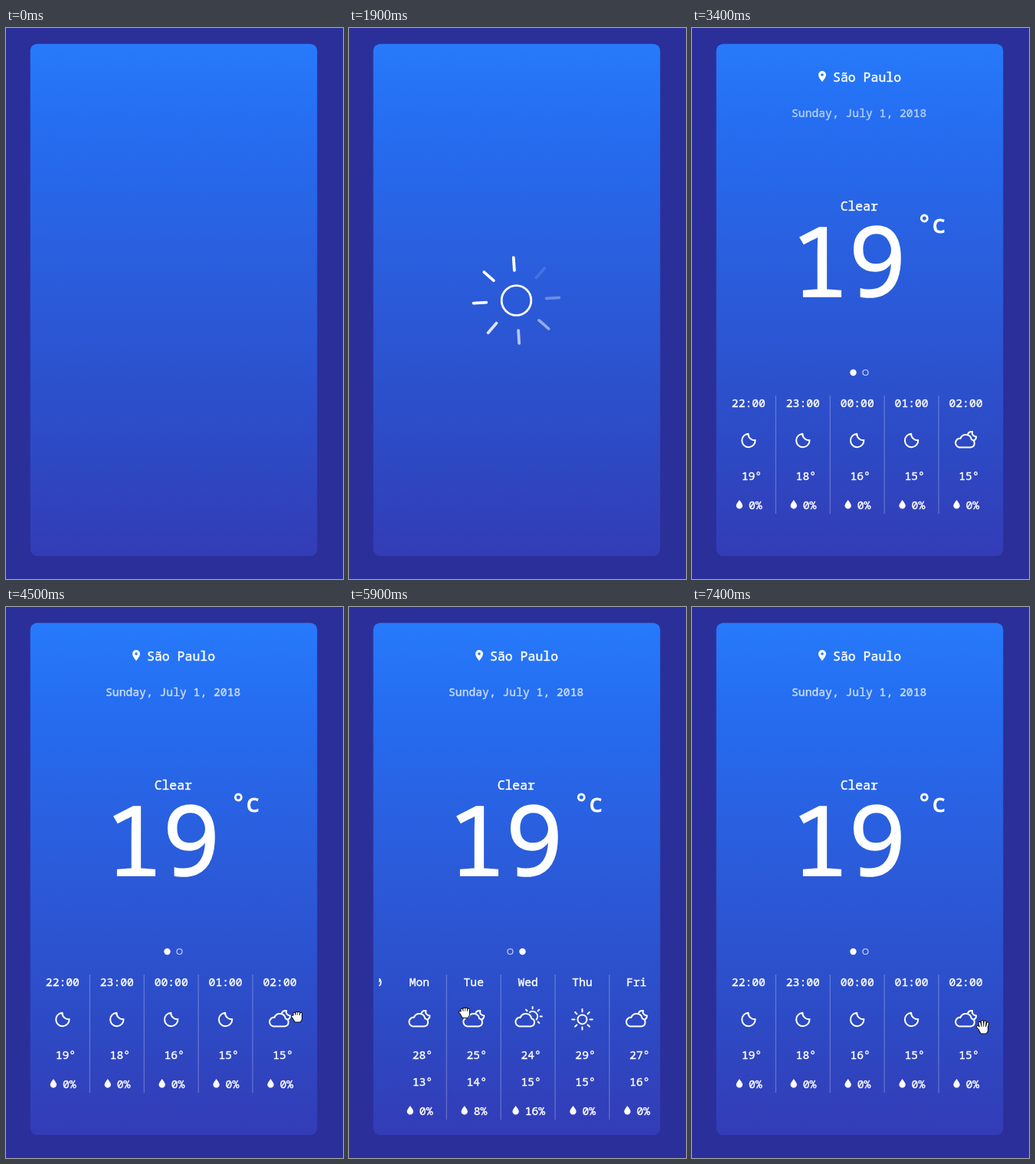
These frames come from a looping animation (440x718 px, 7500 ms). An HTML page:

```html
<!DOCTYPE html>
<html lang="en">
<head>
<meta charset="utf-8">
<title>Weather card</title>
<style>
  html, body { margin: 0; width: 100%; height: 100%; overflow: hidden; background: #2b2f99; }
  svg { display: block; }
  text {
    font-family: "Noto Sans Mono", "DejaVu Sans Mono", monospace; font-size: 14.7px;
    fill: #fff; stroke: #fff; stroke-width: .4px; white-space: pre;
  }
  .line { fill: none; stroke: #fff; stroke-width: 2; stroke-linecap: round; stroke-linejoin: round; }
</style>
</head>
<body>
<svg id="stage" width="440" height="718" viewBox="0 0 440 718">
  <defs>
    <linearGradient id="sky" x1="0" y1="0" x2="0" y2="1">
      <stop offset="0" stop-color="#277afb"/>
      <stop offset=".16" stop-color="#256df1"/>
      <stop offset=".5" stop-color="#2b5ad8"/>
      <stop offset=".78" stop-color="#2d4ac5"/>
      <stop offset="1" stop-color="#333cb6"/>
    </linearGradient>
    <clipPath id="view"><rect x="39" y="470" width="359" height="210"/></clipPath>
  </defs>
  <rect width="440" height="718" fill="#2b2f99"/>
  <rect x="31.7" y="20.7" width="374.6" height="667.4" rx="9" fill="url(#sky)"/>

  <g id="loader" transform="translate(218.5 355)">
    <circle id="ring" r="19.3" class="line" style="stroke-width:2.8"/>
    <g id="rays"></g>
  </g>

  <g id="place">
    <path fill="#fff" fill-rule="evenodd" d="M170 70.3C167.5 66.8 165 64 165 61a5 5 0 0 1 10 0C175 64 172.5 66.8 170 70.3ZM168.2 61a1.8 1.8 0 1 0 3.6 0a1.8 1.8 0 1 0-3.6 0Z"/>
    <text x="184" y="70" style="font-size:16.5px">São Paulo</text>
  </g>
  <text id="date" x="130" y="116">Sunday, July 1, 2018</text>
  <g id="now">
    <text x="193.7" y="238" style="font-size:16.4px">Clear</text>
    <text x="129" y="350.3" style="font-size:125.5px;stroke-width:1.6px">19</text>
    <text x="293.8" y="267" style="font-size:32px;stroke-width:.9px">°c</text>
  </g>
  <g id="forecast">
    <circle id="dot0" cx="210.5" cy="449" stroke="#fff" stroke-width="1.2"/>
    <circle id="dot1" cx="226.5" cy="449" stroke="#fff" stroke-width="1.2"/>
    <g clip-path="url(#view)"><g id="strip"></g></g>
  </g>
  <g id="cursor">
    <path id="shade" stroke="#111" stroke-width="4" fill="#111" stroke-linejoin="round" stroke-linecap="round"/>
    <path id="skin" stroke="#fff" stroke-width="1.9" fill="#fff" stroke-linejoin="round" stroke-linecap="round"/>
  </g>
</svg>
<script>
const LOOP = 7500, COL = 70.9, FIRST = 73.9, PAGE = COL * 5;
const $ = id => document.getElementById(id);
const clamp = v => Math.min(1, Math.max(0, v));
const part = (t, from, length) => clamp((t - from) / length);
const mix = (a, b, u) => a + (b - a) * u;
const easeOut = u => 1 - (1 - u) ** 2;
const easeInOut = u => u * u * (3 - 2 * u);

function add(parent, tag, attrs, text) {
  const el = document.createElementNS("http://www.w3.org/2000/svg", tag);
  for (const k in attrs) el.setAttribute(k, attrs[k]);
  if (text) el.textContent = text;
  return parent.appendChild(el);
}

// Spokes around a point as path data, angles in degrees
const spokes = (cx, cy, r0, r1, angles) => angles.map(a => {
  const c = Math.cos(a * Math.PI / 180), s = Math.sin(a * Math.PI / 180);
  return `M${cx + r0 * c} ${cy + r0 * s}L${cx + r1 * c} ${cy + r1 * s}`;
}).join("");

const eighths = [0, 45, 90, 135, 180, 225, 270, 315];
const CLOUD = "M-8.5 9H6.5A5.2 5.2 0 0 0 7.4 -1.2A7.5 7.5 0 0 0 -7 -2.5A5.8 5.8 0 0 0 -8.5 9Z";
const icons = {
  moon: [["M8.7 -.3A8.7 8.7 0 1 1 -.4 -8.6A8 8 0 0 0 8.7 -.3Z", 0]],
  cloudMoon: [[CLOUD, 0], ["M2.6 -8.2C3.4 -10.6 5.6 -11.8 8.6 -11.4C7.4 -8 9.8 -5 13.6 -5C13.6 -2.8 12.6 -1 10.8 .2", 0]],
  cloudSun: [[CLOUD, -2.8], ["M2.3 -9.3A6.5 6.5 0 0 1 11 .2" +
    spokes(6, -4, 10, 12.3, [-135, -90, -45, 0, 45]), 0]],
  sun: [["M-6 0a6 6 0 1 0 12 0a6 6 0 1 0 -12 0" + spokes(0, 0, 10, 13.3, eighths), 0]]
};

// label, icon, temperatures, rain
const columns = [
  ["22:00", "moon", [19], 0], ["23:00", "moon", [18], 0], ["00:00", "moon", [16], 0],
  ["01:00", "moon", [15], 0], ["02:00", "cloudMoon", [15], 0],
  ["Mon", "cloudMoon", [28, 13], 0], ["Tue", "cloudMoon", [25, 14], 8],
  ["Wed", "cloudSun", [24, 15], 16], ["Thu", "sun", [29, 15], 0], ["Fri", "cloudMoon", [27, 16], 0]
];

columns.forEach(([label, icon, temps, rain], i) => {
  const g = add($("strip"), "g", { transform: `translate(${FIRST + i * COL} 0)` });
  const bottom = temps.length > 1 ? 35 : 0;
  const middle = { "text-anchor": "middle" };
  add(g, "text", { ...middle, x: 0, y: 494 }, label);
  for (const [d, dx] of icons[icon])
    add(g, "path", { class: "line", d, transform: `translate(${dx} 537.4)` });
  temps.forEach((v, n) => add(g, "text", { ...middle, x: 4, y: 589 + n * 35 }, v + "°"));
  const shift = rain > 9 ? -4 : 0;
  add(g, "path", {
    fill: "#fff", transform: `translate(${shift - 12} ${621 + bottom})`,
    d: "M0 -6C2 -3 4.2 -1 4.2 1.4A4.2 4.2 0 0 1 -4.2 1.4C-4.2 -1 -2 -3 0 -6Z"
  });
  add(g, "text", { x: shift, y: 627 + bottom }, rain + "%");
  if (i % 5 < 4)
    add(g, "path", { d: `M${COL / 2} 479V${633 + bottom}`, stroke: "#fff", "stroke-opacity": .32 });
});

const rays = eighths.map(a => add($("rays"), "path", {
  class: "line", d: "M0 -39.3V-56", style: "stroke-width:3.8", transform: `rotate(${a})`
}));

const PALM = "M-4 1L5 1L5 5L3.5 7.5L-2 7.5L-4 4Z";
const ARROW = "M-5 -8V7L-1.5 4L1 9L3 8L.8 3.2H5Z";
const OPEN = PALM + "M-3 1L-4.5 -5M-.5 0L-1 -7M2 0L2.6 -6.6M4.7 1L6.2 -4.5M-3.5 4L-7 0";
const FIST = PALM + "M-3 1L-3.6 -2M-.5 0V-3M2 0L2.2 -3M4.7 1L5.2 -2M-3.5 4L-6 1.5";

const DRAG1 = { from: 4500, length: 350 }, DRAG2 = { from: 5835, length: 400 };
const SETTLE = 590, SWIPE = 247;

function scrollAt(t) {
  const near = PAGE - SWIPE;
  const swipe = d => SWIPE * easeInOut(part(t, d.from, d.length)) +
    near * easeOut(part(t, d.from + d.length, SETTLE));
  return swipe(DRAG1) - swipe(DRAG2);
}

function drawCursor(t) {
  const enter = easeOut(part(t, 3750, 600));
  const left = easeInOut(part(t, DRAG1.from, DRAG1.length));
  const right = easeInOut(part(t, DRAG2.from, DRAG2.length));
  const x = mix(450, 380, enter) - SWIPE * left + SWIPE * right;
  const y = mix(640, 532, enter) - 7 * left + 22 * right;
  const held = [DRAG1, DRAG2].some(d => t >= d.from && t < d.from + d.length);
  const shape = x > 398 ? ARROW : held ? FIST : OPEN;
  $("cursor").setAttribute("transform", `translate(${x} ${y})`);
  $("cursor").setAttribute("opacity", t < 3750 ? 0 : 1);
  $("shade").setAttribute("d", shape);
  $("skin").setAttribute("d", shape);
}

function reveal(id, t, from, length, dy, full = 1) {
  const u = part(t, from, length);
  $(id).setAttribute("opacity", full * u);
  $(id).setAttribute("transform", `translate(0 ${dy * (1 - easeOut(u))})`);
}

function setDot(id, on) {
  $(id).setAttribute("r", on ? 3.6 : 3.5);
  $(id).setAttribute("fill", on ? "#fff" : "none");
  $(id).setAttribute("stroke-opacity", on ? 1 : .75);
}

function draw(t) {
  $("rays").setAttribute("transform", `rotate(${22.2 + t / 100})`);
  rays.forEach((ray, i) => ray.setAttribute("opacity",
    part(t, 100 + 75 * i, 350) * (1 - part(t, 1510 + 80 * i, 450))));
  $("ring").setAttribute("opacity", part(t, 50, 300) * (1 - part(t, 2100, 380)));

  reveal("place", t, 2450, 700, -20);
  reveal("date", t, 2800, 690, 0, .76);
  reveal("now", t, 2500, 700, 0);
  reveal("forecast", t, 2600, 700, 20);

  const scroll = scrollAt(t), second = scroll > PAGE / 2;
  $("strip").setAttribute("transform", `translate(${-scroll} 0)`);
  setDot("dot0", !second);
  setDot("dot1", second);
  drawCursor(t);
}

const start = performance.now();
function tick() {
  draw((performance.now() - start) % LOOP);
  requestAnimationFrame(tick);
}
tick();
</script>
</body>
</html>
```
